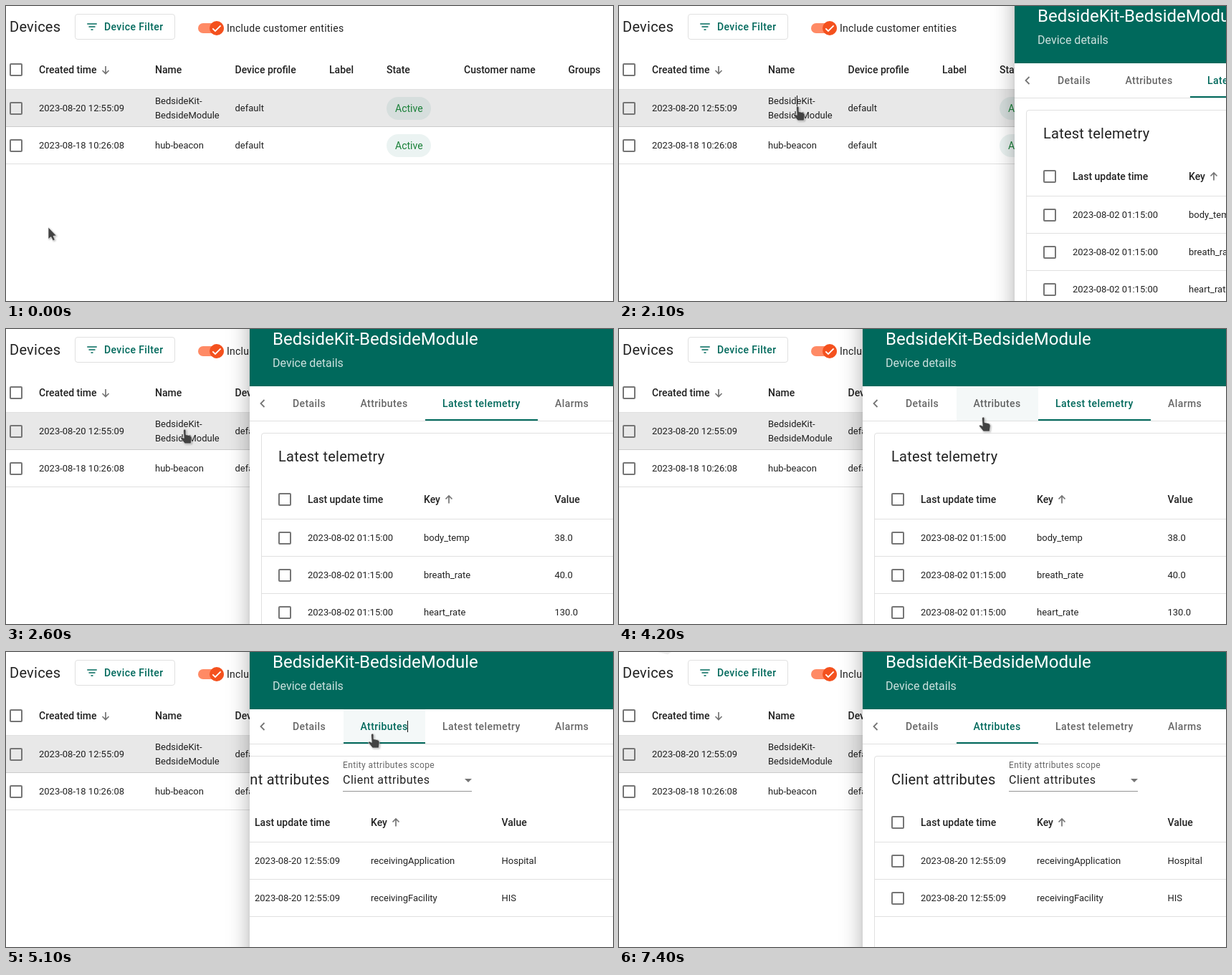
These frames come from a looping animation (847 px wide and 412 px high, 7.5 s). An HTML page:

```html
<!DOCTYPE html>
<html lang="en">
<head>
<meta charset="utf-8">
<title>Device attributes</title>
<style>
html, body { margin: 0; width: 100%; height: 100%; overflow: hidden; background: #fff; }
#stage { position: relative; width: 847px; height: 412px; overflow: hidden; background: #fff;
  font: 400 13px/20px Roboto, sans-serif; color: rgba(0,0,0,.87); }
#stage div, #stage span, #stage svg { position: absolute; box-sizing: border-box; }
#stage svg { left: 0; top: 0; overflow: visible; }
span { white-space: pre; }
.head { font-size: 14px; font-weight: 500; }
.big { font-size: 20px; letter-spacing: .25px; }
.button { font-size: 14px; font-weight: 500; letter-spacing: .4px; color: #00695c; }
.tab { font-size: 14px; font-weight: 500; letter-spacing: .4px; color: rgba(0,0,0,.6); }
.tab.on { color: #00695c; }
.switch { font-size: 14px; letter-spacing: .25px; }
.state { font-size: 14px; color: #198038; }
.title { font-size: 24px; color: #fff; }
.sub { font-size: 16px; color: rgba(255,255,255,.8); }
.hint { font-size: 12px; letter-spacing: .375px; color: rgba(0,0,0,.6); }
.select { font-size: 16px; letter-spacing: .5px; }
.box { width: 18px; height: 18px; border: 2px solid #757575; border-radius: 2px; }
.line { height: 1px; background: rgba(0,0,0,.12); }
.badge { width: 62px; height: 32px; border-radius: 16px; background: rgba(0,105,92,.08); }
.caret { width: 1px; height: 16px; background: #111; }
.view { left: 0; top: 0; width: 1000px; height: 520px; }
.card { left: 16px; top: 145px; width: 968px; height: 400px; border: 1px solid #e0e0e0; border-radius: 4px; }
#panel { left: 340px; top: 0; width: 1000px; height: 412px; }
#sheet { left: 0; top: -60px; width: 1000px; height: 560px; background: #fff;
  box-shadow: 0 8px 10px -5px rgba(0,0,0,.2), 0 16px 24px 2px rgba(0,0,0,.14), 0 6px 30px 5px rgba(0,0,0,.12); }
#bar { left: 0; top: 0; width: 1000px; height: 80px; background: #00695c; }
#hover { left: 131px; top: 80px; width: 114px; height: 48px; background: rgba(0,105,92,.045); }
#ink { top: 126px; height: 2px; background: #00695c; }
#views { left: 0; top: 0; width: 1000px; height: 520px; clip-path: inset(129px 0 0 0); }
#cursor { filter: drop-shadow(1px 1px 1px rgba(0,0,0,.3)); }
</style>
</head>
<body>
<div id="stage">
  <div id="list">
    <div style="left:0;top:117px;width:847px;height:51px;background:#e8e8e8"></div>
    <div style="left:0;top:168px;width:847px;height:1px;background:#ccc"></div>
    <div style="left:96px;top:11px;width:140px;height:36px;border:1px solid #e0e0e0;border-radius:4px"></div>
    <svg width="847" height="412">
      <path d="M113.25 25h13.5M115.5 29h9M118.5 33h3" stroke="#00695c" stroke-width="1.5"/>
      <rect x="268" y="24" width="36" height="14" rx="7" fill="#ff8a65"/>
      <circle cx="294" cy="31" r="10" fill="#f4511e"/>
      <path d="M288.3 31.4l3.7 3.6 7.6-7.6" fill="none" stroke="#fff" stroke-width="1.8"/>
      <path d="M139 84v10.5M134.5 90l4.5 4.5 4.5-4.5" fill="none" stroke="#757575" stroke-width="1.7"/>
    </svg>
  </div>
  <div class="caret" id="nameCaret" style="left:248px;top:125px"></div>
  <div id="panel">
    <div id="sheet"></div>
    <div id="views">
      <div class="view" id="telemetry"></div>
      <div class="view" id="attributes">
        <svg width="600" height="412">
          <path d="M374 177h10l-5 5z" fill="#757575"/>
          <path d="M204 194.5h180" stroke="#949494"/>
        </svg>
      </div>
    </div>
    <div id="bar"></div>
    <div id="hover"></div>
    <div class="line" style="left:0;top:128px;width:1000px"></div>
    <div id="ink"></div>
    <svg width="600" height="412"><path d="M20.5 99l-5 5 5 5" fill="none" stroke="#757575" stroke-width="1.8"/></svg>
    <div class="caret" id="tabCaret" style="left:220px;top:96px"></div>
  </div>
  <svg width="847" height="412">
    <path id="trace" d="M54 0L68 3.5 73 0z" fill="#efefef"/>
    <g id="cursor" fill="#424242" stroke="#fff" stroke-width=".6">
      <path id="arrow" d="M0 0V16.5L3.8 13.5 6.5 18.8 9.3 17.4 7 12.3 11.3 11.8z"/>
      <path id="hand" d="M-2.5 2Q-2.5 0-.7 0T1 2V7.5L6 8.6Q9.5 9.4 9.2 12.5L8.2 20H-.5L-6.5 12.5Q-6 10.8-4 11.2L-1.7 12.5z"/>
    </g>
  </svg>
</div>
<script>
const LOOP = 7500, TICK = 100, PAGE = 1000;
const $ = id => document.getElementById(id);

function add(parent, tag, cls, x, y, text = '') {
  const el = document.createElement(tag);
  el.className = cls;
  el.textContent = text;
  el.style.left = x + 'px';
  el.style.top = y + 'px';
  parent.append(el);
  return el;
}
// y is the middle of the line of text
const label = (parent, cls, x, y, text) => add(parent, 'span', cls, x, y - 10, text);
const check = (parent, x, y) => add(parent, 'div', 'box', x, y - 9);
const rule = (parent, x, y, width) => { add(parent, 'div', 'line', x, y).style.width = width + 'px'; };

function buildList() {
  const list = $('list');
  label(list, 'big', 5, 29, 'Devices');
  label(list, 'button', 137, 29, 'Device Filter');
  label(list, 'switch', 308, 31, 'Include customer entities');
  const heads = [[46, 'Created time'], [208, 'Name'], [319.5, 'Device profile'], [451, 'Label'],
    [531, 'State'], [639, 'Customer name'], [784.5, 'Groups']];
  heads.forEach(([x, text]) => label(list, 'head', x, 89, text));
  check(list, 5, 89);
  rule(list, 0, 116, 847);
  rule(list, 0, 220, 847);
  const rows = [[142.5, '2023-08-20 12:55:09', ['BedsideKit-', 'BedsideModule']],
    [194.5, '2023-08-18 10:26:08', ['hub-beacon']]];
  for (const [y, time, name] of rows) {
    check(list, 5, y + .5);
    label(list, '', 46, y, time);
    name.forEach((part, i) => label(list, '', 208, y + 20 * i - 10 * (name.length - 1), part));
    label(list, '', 319.5, y, 'default');
    add(list, 'div', 'badge', 531, y - 15.5);
    label(list, 'state', 543, y + .5, 'Active');
  }
}

function buildView(view, title, rows) {
  add(view, 'div', 'card', 16, 145);
  label(view, 'big', 40, 178, title);
  check(view, 40, 238);
  label(view, 'head', 81, 238, 'Last update time');
  label(view, 'head', 243, 238, 'Key');
  label(view, 'head', 425.5, 238, 'Value');
  view.insertAdjacentHTML('beforeend', '<svg width="600" height="412"><path d="M278 243.5v-10.5' +
    'M273.5 237.5l4.5-4.5 4.5 4.5" fill="none" stroke="#757575" stroke-width="1.7"/></svg>');
  rule(view, 17, 265, 966);
  rows.forEach(([time, key, value], i) => {
    const y = 291.5 + 52 * i;
    check(view, 40, y + .5);
    label(view, '', 81, y, time);
    label(view, '', 243, y, key);
    label(view, '', 425.5, y, value);
    rule(view, 17, y + 25.5, 966);
  });
}

buildList();
const measured = '2023-08-02 01:15:00', created = '2023-08-20 12:55:09';
buildView($('telemetry'), 'Latest telemetry', [[measured, 'body_temp', '38.0'],
  [measured, 'breath_rate', '40.0'], [measured, 'heart_rate', '130.0']]);
buildView($('attributes'), 'Client attributes', [[created, 'receivingApplication', 'Hospital'],
  [created, 'receivingFacility', 'HIS']]);
label($('attributes'), 'hint', 204, 158, 'Entity attributes scope');
label($('attributes'), 'select', 204, 178.5, 'Client attributes');

const panel = $('panel');
label(panel, 'title', 32, 14, 'BedsideKit-BedsideModule');
label(panel, 'sub', 32, 47.5, 'Device details');
const [, attributesTab, telemetryTab] = [[60, 'Details'], [154.5, 'Attributes'], [269, 'Latest telemetry'],
  [426, 'Alarms']].map(([x, text]) => label(panel, 'tab', x, 104, text));

// Values hold from their start time, one per tick
const path = {
  0: [[59, 309]],
  700: [[63, 305], [82, 284], [118, 250], [162, 214], [205, 180], [238, 156], [252, 147], [252, 146], [250, 140]],
  3700: [[262, 146], [306, 154], [372, 157], [432, 150], [482, 136], [509, 123], [513, 117], [512, 114]],
  5900: [[467, 98], [60, -40]]
};
const drawer = { 0: [900], 2100: [212, 62, 12, 0] };
const paging = { 0: [-PAGE], 4800: [-970, -740, -330, -74, -8, 0] };
const inkMove = { 0: [0], 4500: [.02, .16, .52, .84, .97, 1] };

function at(track, time) {
  const start = Math.max(...Object.keys(track).map(Number).filter(k => k <= time));
  const values = track[start];
  return values[Math.min(values.length - 1, Math.floor((time - start) / TICK))];
}
const during = (t, from, to) => t >= from && t < to;
const show = (id, on) => { $(id).style.visibility = on ? 'visible' : 'hidden'; };
const slide = (id, x) => { $(id).style.transform = `translateX(${x}px)`; };

function draw(t) {
  const [x, y] = at(path, t);
  const overPanel = t >= 2100 && x > 340;
  const pointing = overPanel ? y < 128 : y < 221;
  $('cursor').setAttribute('transform', `translate(${x} ${y})`);
  show('hand', pointing);
  show('arrow', !pointing);
  show('trace', t >= 6000);

  slide('panel', at(drawer, t));
  const page = at(paging, t);
  slide('attributes', page);
  slide('telemetry', page + PAGE);

  const ink = at(inkMove, t);
  $('ink').style.left = 245 - 114 * ink + 'px';
  $('ink').style.width = 157 - 43 * ink + 'px';
  attributesTab.classList.toggle('on', t >= 4500);
  telemetryTab.classList.toggle('on', t < 4500);
  show('hover', during(t, 4200, 5900));
  show('nameCaret', during(t, 1900, 2600));
  show('tabCaret', during(t, 4600, 5600) || during(t, 6600, 7400));
}

const begin = performance.now();
function frame() {
  const t = (performance.now() - begin) % LOOP;
  draw(Math.floor(t / TICK) * TICK);
  requestAnimationFrame(frame);
}
frame();
</script>
</body>
</html>
```
